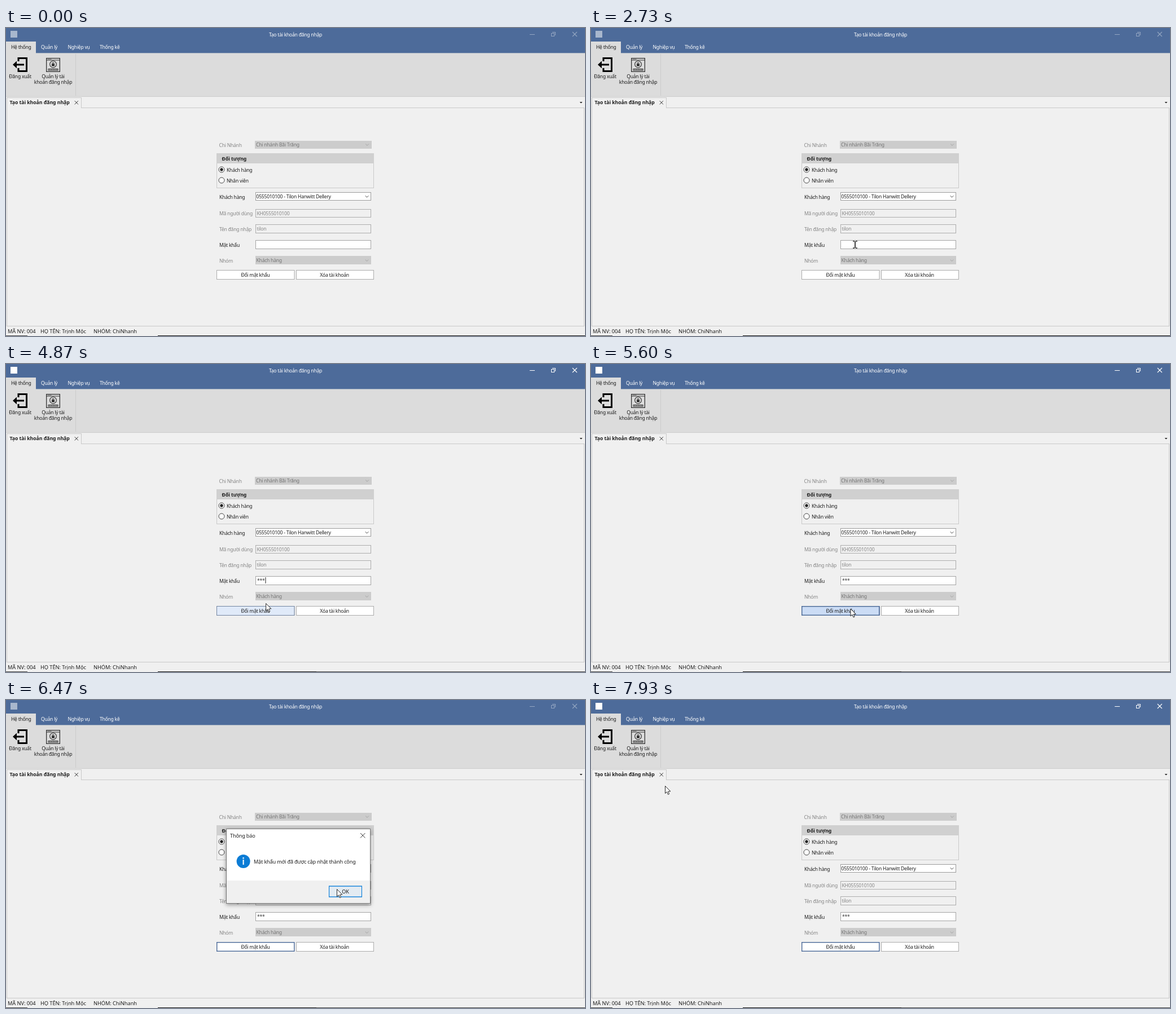
Recreate the animation shown at these times as an HTML page with a canvas. Size 1026 px wide and 546 px high, loop 8000 ms.

```html
<!DOCTYPE html>
<html lang="vi">
<head>
<meta charset="utf-8">
<style>
html, body { margin: 0; width: 100%; height: 100%; overflow: hidden; background: #f0f0f0; }
canvas { display: block; width: 1026px; height: 546px; }
</style>
</head>
<body>
<canvas id="stage" width="1026" height="546"></canvas>
<script>
const LOOP = 8000, STEP = 1000 / 15;
const BLUE = '#4d6b9a', INK = '#1e1e1e', DIM = '#868686';
const screen = document.getElementById('stage').getContext('2d');
const layer = document.createElement('canvas');
layer.width = 1026;
layer.height = 546;
const layerCtx = layer.getContext('2d');
let c = screen;

const FONTS = {
  ui: ['8.6px "Noto Sans", sans-serif', '-0.25px'],
  bold: ['bold 8.7px "Noto Sans", sans-serif', '-0.05px'],
  status: ['9.3px "Noto Sans", sans-serif', '-0.08px'],
  dialog: ['9.1px "Noto Sans", sans-serif', '-0.15px']
};

// Pointer path: step, x, y
const PATH = [
  [1, 978, 505], [2, 640, 330], [3, 479, 231], [6, 479, 231], [10, 498, 258],
  [12, 490, 278], [15, 472, 268], [19, 472, 268], [23, 473.5, 381], [31, 473.5, 381],
  [34, 468, 384], [63, 468, 384], [64, 468, 386], [75, 459, 433], [76, 460, 434],
  [84, 460, 434], [89, 471, 410], [93, 560, 365], [95, 586.5, 335.5], [105, 586.5, 335.5],
  [109, 303, 195], [111, 303, 195], [114, 131, 158], [115, 138, 156], [117, 138, 156],
  [119, 131.5, 152.5]
];

const clamp = v => Math.max(0, Math.min(1, v));
const within = (v, a, b) => v >= a && v <= b;

function pointer(n) {
  if (n < 1) return { x: 1100, y: 600 };
  const i = Math.max(1, PATH.findIndex(k => k[0] >= n));
  const [n0, x0, y0] = PATH[i - 1], [n1, x1, y1] = PATH[i];
  const p = clamp((n - n0) / (n1 - n0));
  return { x: x0 + (x1 - x0) * p, y: y0 + (y1 - y0) * p };
}

function text(s, x, y, color = INK, font = 'ui', align = 'left') {
  [c.font, c.letterSpacing] = FONTS[font];
  c.textAlign = align;
  c.fillStyle = color;
  c.fillText(s, x, y + 3.1);
}

function rect(x, y, w, h, color) {
  c.fillStyle = color;
  c.fillRect(x, y, w, h);
}

function box(x, y, w, h, fill, border, line = 1) {
  rect(x + line, y + line, w - 2 * line, h - 2 * line, fill);
  c.strokeStyle = border;
  c.lineWidth = line;
  c.strokeRect(x + line / 2, y + line / 2, w - line, h - line);
}

function stroke(points, color, width = 1) {
  c.beginPath();
  points.forEach(([x, y], i) => i ? c.lineTo(x, y) : c.moveTo(x, y));
  c.strokeStyle = color;
  c.lineWidth = width;
  c.stroke();
}

function polygon(points, fill) {
  c.beginPath();
  points.forEach(([x, y]) => c.lineTo(x, y));
  c.closePath();
  c.fillStyle = fill;
  c.fill();
}

function disc(x, y, r, fill, border, width = 1) {
  c.beginPath();
  c.arc(x, y, r, 0, 7);
  if (fill) { c.fillStyle = fill; c.fill(); }
  if (border) { c.strokeStyle = border; c.lineWidth = width; c.stroke(); }
}

function cross(x, y, r, color, width = 1) {
  stroke([[x - r, y - r], [x + r, y + r]], color, width);
  stroke([[x + r, y - r], [x - r, y + r]], color, width);
}

function chevron(x, y, color) {
  stroke([[x - 2.8, y - 1.4], [x, y + 1.4], [x + 2.8, y - 1.4]], color);
}

function titleBar(active) {
  const mark = active ? '#ffffff' : '#94a6c2';
  rect(0, 0, 1026, 44.4, BLUE);
  rect(8, 5, 12, 12, active ? '#ffffff' : '#a8b7cd');
  text('Tạo tài khoản đăng nhập', 513, 11.5, '#ffffff', 'ui', 'center');
  rect(928, 11, 9, 1, mark);
  c.strokeStyle = mark;
  c.lineWidth = 1;
  c.strokeRect(966.5, 9.5, 5, 5);
  stroke([[968, 7.5], [973.5, 7.5], [973.5, 13]], mark);
  cross(1007.8, 11, 4, mark, 1.1);
  rect(0, 24, 53, 21, '#dcdcdc');
  text('Hệ thống', 9, 34.3);
  text('Quản lý', 62, 34.3, '#ffffff');
  text('Nghiệp vụ', 109.5, 34.3, '#ffffff');
  text('Thống kê', 166, 34.3, '#ffffff');
}

function ribbon() {
  rect(0, 44, 1026, 78, '#dcdcdc');
  rect(0, 121, 1026, 1, '#cdcdcd');
  rect(123, 46, 1, 74, '#cbcbcb');

  stroke([[22, 59], [22, 53.5], [36.5, 53.5], [36.5, 76.5], [22, 76.5], [22, 71]], '#000', 3);
  rect(16, 63.5, 16, 3, '#000');
  polygon([[12, 65], [19, 58.5], [19, 71.5]], '#000');
  text('Đăng xuất', 25, 85.5, INK, 'ui', 'center');

  box(71, 53, 25, 25, '#dcdcdc', '#333', 1.3);
  rect(72, 56.5, 23, 1, '#333');
  rect(73.5, 54.7, 7, 1, '#666');
  disc(83.5, 64.3, 5.8, null, '#333', 1.2);
  rect(81, 63.8, 5, 3.6, '#222');
  c.beginPath();
  c.arc(83.5, 63.6, 1.7, Math.PI, 0);
  c.strokeStyle = '#222';
  c.stroke();
  box(74.5, 72, 18, 3.6, '#dcdcdc', '#333');
  for (let x = 77; x < 91; x += 3) rect(x, 73.3, 1.4, 1.2, '#333');
  text('Quản lý tài', 83.5, 85.5, INK, 'ui', 'center');
  text('khoản đăng nhập', 83.5, 95.5, INK, 'ui', 'center');
}

function pageFrame(n) {
  rect(0, 122, 1026, 424, '#f0f0f0');
  const edge = '#c9c9c9';
  rect(1, 123, 1, 406, edge);
  rect(1, 123, 133, 1, edge);
  rect(133, 123, 1, 19, edge);
  rect(133, 141, 892, 1, edge);
  rect(1024, 141, 1, 388, edge);
  rect(1, 528, 1024, 1, edge);
  text('Tạo tài khoản đăng nhập', 6.5, 132.2, INK, 'bold');
  cross(124.8, 132.3, 3.1, '#333');
  polygon([[1016.5, 131], [1021.5, 131], [1019, 133.6]], '#222');

  text('MÃ NV: 004', 3, 538.3, INK, 'status');
  text('HỌ TÊN: Trịnh Mộc', 61, 538.3, INK, 'status');
  text('NHÓM: ChiNhanh', 155, 538.3, INK, 'status');
  rect(0, 545, 38, 1, '#444');
  rect(269, 545, 281, 1, '#111');
  rect(550, 545, 476, 1, n < 42 ? '#111' : '#444');
}

function radio(y, label, checked, hover) {
  disc(382, y, 5, hover ? '#cbdcf5' : '#fff', hover ? BLUE : '#444');
  if (checked) disc(382, y, 2.7, '#222');
  text(label, 391, y + 0.5);
}

function form(n, p) {
  text('Chi Nhánh', 377.5, 208.3, DIM);
  rect(441, 200, 207, 14, '#cccccc');
  text('Chi nhánh Bãi Trăng', 443, 207.3, '#747474');
  chevron(640, 207, '#a4a4a4');

  box(373, 222, 279, 62, '#f0f0f0', '#cacaca');
  rect(373, 222, 279, 18, '#d0d0d0');
  text('Đối tượng', 382.5, 231.7, INK, 'bold');
  const overGroup = n < 30 && within(p.x, 375, 650);
  radio(251, 'Khách hàng', true, overGroup && within(p.y, 243, 260));
  radio(270, 'Nhân viên', false, overGroup && within(p.y, 261, 281));

  text('Khách hàng', 378, 300.3);
  box(442, 291, 205, 15, '#fff', '#9c9c9c');
  text('0555010100 - Tilon Hanwitt Dellery', 443.5, 298.5);
  chevron(639.5, 298.7, '#444');

  text('Mã người dùng', 378, 329.2, DIM);
  box(442, 321, 205, 15, '#f0f0f0', '#adadad');
  text('KH0555010100', 444.5, 328.5, DIM);

  text('Tên đăng nhập', 378, 357.2, DIM);
  box(442, 348, 205, 16, '#f0f0f0', '#adadad');
  text('tilon', 444.5, 356.3, DIM);

  text('Mật khẩu', 378, 384.7);
  box(442, 376, 205, 16, '#fff', '#a4a4a4');
  const stars = Math.max(0, Math.min(3, n - 51));
  text('*'.repeat(stars), 445, 384.2, '#333');
  const caretOn = within(n, 42, 48) || within(n, 55, 62) || within(n, 71, 78);
  if (caretOn) rect(stars ? 459.5 : 444, 378, 1, 11, '#222');

  text('Nhóm', 378, 413, DIM);
  rect(442, 404, 205, 15, '#cccccc');
  text('Khách hàng', 443.5, 411.9, '#747474');
  chevron(639.5, 412, '#a4a4a4');

  changeButton(n);
  box(514, 429, 138, 17, '#fff', '#acacac');
  text('Xóa tài khoản', 582, 438, INK, 'ui', 'center');
}

function changeButton(n) {
  const focused = n >= 79;
  const line = focused ? 1.4 : 1;
  box(373, 429, 138.5, 17, '#fff', focused ? BLUE : '#acacac', line);
  c.globalAlpha = n < 85 ? clamp((n - 70) / 5) : 0;
  box(373, 429, 138.5, 17, within(n, 79, 82) ? '#b7cdee' : '#cbdcf5', BLUE, line);
  c.globalAlpha = 1;
  text('Đổi mật khẩu', 442, 438, INK, 'ui', 'center');
}

function dialog(n) {
  const opening = clamp((n - 84) / 4), closing = clamp((n - 103) / 5);
  const alpha = (1 - (1 - opening) ** 2) * (1 - closing ** 1.5);
  if (alpha <= 0) return;
  const scale = 1 - 0.03 * (1 - opening) - 0.03 * closing;

  c = layerCtx;
  c.clearRect(0, 0, 1026, 546);
  c.save();
  c.translate(518, 294.5);
  c.scale(scale, scale);
  c.translate(-518, -294.5);
  c.shadowColor = 'rgba(0,0,0,0.4)';
  c.shadowBlur = 7;
  c.shadowOffsetY = 2;
  rect(390, 228, 256, 133, '#777');
  c.shadowColor = 'transparent';
  rect(391, 229, 254, 131, '#fff');
  rect(391, 320, 254, 40, '#f0f0f0');
  text('Thông báo', 397, 240.7, INK, 'dialog');
  if (n < 102) cross(632.2, 240.2, 4.2, '#333');
  disc(420.6, 286, 12, '#0c7cd5');
  rect(419.6, 283, 2, 9, '#fff');
  disc(420.6, 280.2, 1.3, '#fff');
  text('Mật khẩu mới đã được cập nhật thành công', 439, 286.5, INK, 'dialog');
  okButton(n);
  c.restore();

  c = screen;
  c.globalAlpha = alpha;
  c.drawImage(layer, 0, 0);
  c.globalAlpha = 1;
}

function okButton(n) {
  const area = [572, 329.5, 59, 20];
  box(...area, '#e1e1e1', '#1a84da', 1.4);
  c.globalAlpha = clamp((n - 95) / 3);
  if (n >= 102) box(...area, '#cce4f7', '#005499');
  else box(...area, '#e5f1fb', '#0078d7');
  c.globalAlpha = 1;
  text('OK', 601.5, 339.8, INK, 'dialog', 'center');
}

function drawPointer(n, { x, y }) {
  if (n < 1 || within(n, 52, 63)) return;
  if (n < 80 && within(y, 376, 392) && within(x, 442, 647)) {
    for (const end of [-6, 6]) {
      stroke([[x - 4, y + end], [x - 1, y + end]], '#000', 1.2);
      stroke([[x + 1, y + end], [x + 4, y + end]], '#000', 1.2);
    }
    stroke([[x, y - 6], [x, y + 6]], '#000', 1.5);
    return;
  }
  const shape = [[0, 0], [0, 13], [3, 10.3], [5, 15], [7.1, 14.1], [5.2, 9.6], [9.3, 9.4]]
    .map(([dx, dy]) => [x + dx, y + dy]);
  polygon(shape, '#fff');
  c.lineWidth = 0.9;
  c.strokeStyle = '#111';
  c.stroke();
}

function render(ms) {
  const n = Math.floor((ms % LOOP + 5) / STEP) % 120;
  const p = pointer(n);
  c = screen;
  pageFrame(n);
  ribbon();
  titleBar(within(n, 42, 84) || n >= 106);
  form(n, p);
  dialog(n);
  drawPointer(n, p);
}

const start = performance.now();
function tick() {
  render(performance.now() - start);
  requestAnimationFrame(tick);
}
tick();
</script>
</body>
</html>
```
